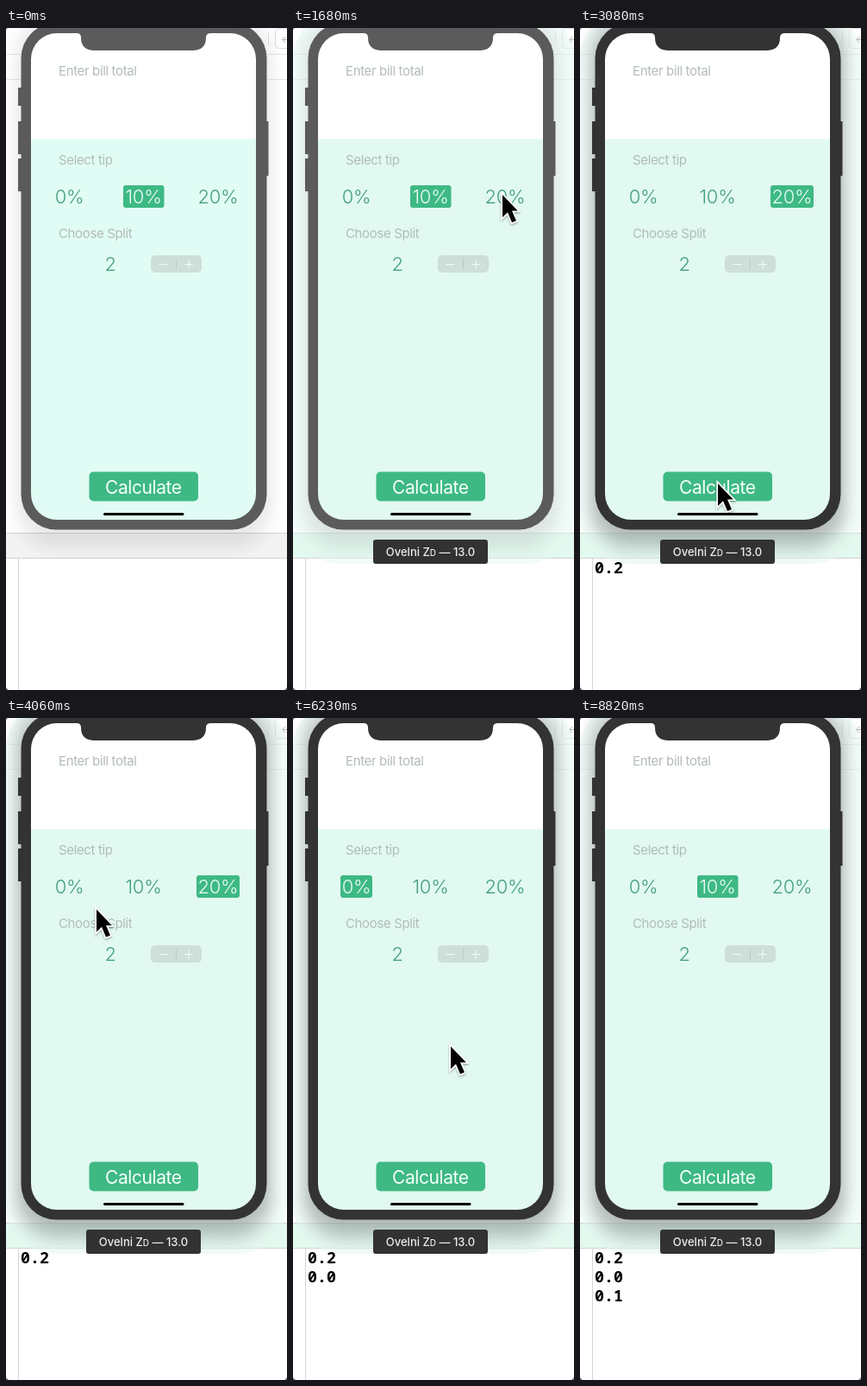
Write an HTML page that moves like this. It is 326x766 px and loops after 8.89 s.

```html
<!DOCTYPE html>
<html lang="en">
<head>
<meta charset="utf-8">
<title>Tip calculator</title>
<style>
  html, body { margin: 0; width: 100%; height: 100%; overflow: hidden; background: #fff; }
  svg { display: block; width: 326px; height: 766px; font-family: Inter, Roboto, sans-serif; }
  .label { font-size: 15px; letter-spacing: -.36px; fill: #b2bcb8; }
  .num { font-size: 22px; font-weight: 300; letter-spacing: -.3px; text-anchor: middle; fill: #459f80; }
  .tip rect { fill: none; }
  .tip.on rect { fill: #3eb984; }
  .tip.on text { fill: #e6fbf4; }
  .log { font: bold 18.3px "Noto Sans Mono", "DejaVu Sans Mono", monospace; fill: #000; }
</style>
</head>
<body>
<svg viewBox="0 0 326 766">
  <defs>
    <filter id="blur" x="-20%" y="-20%" width="140%" height="140%"><feGaussianBlur stdDeviation="8"/></filter>
    <filter id="soft" x="-50%" y="-50%" width="200%" height="200%">
      <feDropShadow dx="0" dy="1.5" stdDeviation="1.2" flood-opacity=".35"/>
    </filter>
    <clipPath id="screen"><rect x="29" y="6" width="261" height="563" rx="30"/></clipPath>
  </defs>

  <!-- editor window -->
  <rect width="326" height="766" fill="#fff"/>
  <path d="M0 30.5H326M0 59.5H326" stroke="#e6e6e6"/>
  <path d="M304.5 4V20" stroke="#e2e2e2"/>
  <rect x="312.5" y=".5" width="30" height="23" rx="4" fill="#fff" stroke="#dedede"/>
  <path d="M327 13.5H321M324 10L320.5 13.5L324 17" fill="none" stroke="#b5b5b5"/>
  <rect id="bar" x="-1" y="584.5" width="328" height="29" stroke="#d3d3d3"/>
  <path d="M14.5 614V766" stroke="#d5d5d5"/>
  <path d="M0 766V763L3 766ZM326 766V763L323 766ZM0 0H2L0 2Z" fill="#777"/>

  <!-- phone -->
  <rect id="halo" x="0" y="-20" width="326" height="640" rx="56" fill="#e3f8ef"/>
  <g id="shade" filter="url(#blur)">
    <rect x="9" y="-20" width="302" height="625" rx="50" opacity=".45"/>
    <rect x="18" y="0" width="284" height="590" rx="42" opacity=".6"/>
  </g>
  <g id="body">
    <path d="M14 69h5v21h-5zM14 108h5v38h-5zM14 151h5v38h-5zM301 108h3.5v63h-3.5z"/>
    <rect x="17.5" y="-6" width="285" height="586.5" rx="41"/>
  </g>
  <g clip-path="url(#screen)">
    <rect x="29" y="6" width="261" height="123" fill="#fff"/>
    <rect id="mint" x="29" y="128.5" width="261" height="441"/>
  </g>
  <path id="notch" d="M82 5H238V6Q232 6 232 11Q232 26 216 26H103Q87 26 87 11Q87 6 82 6Z"/>

  <!-- app -->
  <g class="label">
    <text x="61" y="54.5">Enter bill total</text>
    <text x="61" y="157.5">Select tip</text>
    <text x="61" y="243">Choose Split</text>
  </g>
  <g class="tip"><rect x="55" y="182" width="37" height="26" rx="3"/><text class="num" x="73.5" y="203">0%</text></g>
  <g class="tip"><rect x="136" y="182" width="47.5" height="26" rx="3"/><text class="num" x="159.5" y="203">10%</text></g>
  <g class="tip"><rect x="221" y="182" width="50" height="26" rx="3"/><text class="num" x="246" y="203">20%</text></g>
  <text class="num" x="121" y="280.5">2</text>
  <rect x="168" y="263" width="59" height="20" rx="5" fill="#cddfd8"/>
  <path d="M197.5 267V279" stroke="#b9cac4"/>
  <path d="M177.5 273.500H187.5M207 273.500H217M212 268.500V278.500" stroke="#f2fbf8" stroke-width="1.2"/>
  <rect x="96.5" y="513.5" width="126.500" height="34" rx="5" fill="#3eb984"/>
  <text x="159.3" y="538.5" font-size="21" letter-spacing="-.45" text-anchor="middle" fill="#f5fffb">Calculate</text>
  <rect x="113" y="561" width="93.500" height="3" rx="1.5"/>

  <g id="badge">
    <rect x="93" y="592" width="133" height="28" rx="3" fill="#323232"/>
    <text x="159.5" y="610.5" font-size="13" font-weight="500" text-anchor="middle" fill="#eee">Ovelni Z<tspan font-size="10">D</tspan> — 13.0</text>
  </g>
  <g class="log">
    <text x="17" y="631">0.2</text>
    <text x="17" y="653">0.0</text>
    <text x="17" y="675">0.1</text>
  </g>
  <path id="cursor" d="M0 0V26L6 20.3L11 32L16 29.9L11 18.5H17.8Z" stroke="#fff" stroke-width="3.2" paint-order="stroke" filter="url(#soft)"/>
</svg>
<script>
const LOOP = 8890, STEP = 70;
const HOVER = 980, ACTIVE = 1890;
const picks = [[0, 1], [ACTIVE, 2], [4480, 0], [6720, 1]];
const prints = [2940, 5390, 7700];
// time, x, y of the pointer tip
const path = [
  [0, 225, 960], [350, 218, 775], [700, 198, 440], [1050, 190, 243],
  [1470, 243, 193], [1890, 243, 193], [2170, 179, 338], [2590, 160, 527],
  [3220, 160, 527], [4060, 105, 221.5], [4340, 74, 193], [4690, 74, 193],
  [5180, 161, 528], [5740, 161, 528], [6230, 183, 380], [6580, 160, 193],
  [6930, 160, 193], [7420, 163, 536], [7630, 163, 543.5], [7910, 163, 543.5],
  [8120, 200, 676], [8260, 235, 800], [LOOP, 235, 800]
];
const $ = id => document.getElementById(id);
const tips = document.querySelectorAll('.tip');
const logs = document.querySelectorAll('.log text');
const show = (el, on) => el.setAttribute('visibility', on ? 'visible' : 'hidden');
const fill = (id, color) => $(id).setAttribute('fill', color);

function pointer(t) {
  const i = path.findIndex(k => k[0] > t);
  const [t0, x0, y0] = path[i - 1], [t1, x1, y1] = path[i];
  const u = (t - t0) / (t1 - t0), e = (u + u * u * (3 - 2 * u)) / 2;
  return [x0 + (x1 - x0) * e, y0 + (y1 - y0) * e];
}

function draw(now) {
  const t = Math.floor(now % LOOP / STEP) * STEP;
  const hover = t >= HOVER, active = t >= ACTIVE;
  const frame = active ? '#333' : '#5b5b5b';
  fill('body', frame);
  fill('notch', frame);
  fill('mint', hover ? '#e1f9f1' : '#e1fcf4');
  fill('bar', hover ? '#e3f8ef' : '#f2f2f2');
  $('halo').setAttribute('opacity', hover ? .5 : 0);
  $('shade').setAttribute('opacity', active ? .34 : .12);
  show($('badge'), hover);
  const chosen = picks.filter(p => p[0] <= t).pop()[1];
  tips.forEach((el, i) => el.classList.toggle('on', i === chosen));
  logs.forEach((el, i) => show(el, t >= prints[i]));
  $('cursor').setAttribute('transform', `translate(${pointer(t)})`);
  requestAnimationFrame(draw);
}
requestAnimationFrame(draw);
</script>
</body>
</html>
```
